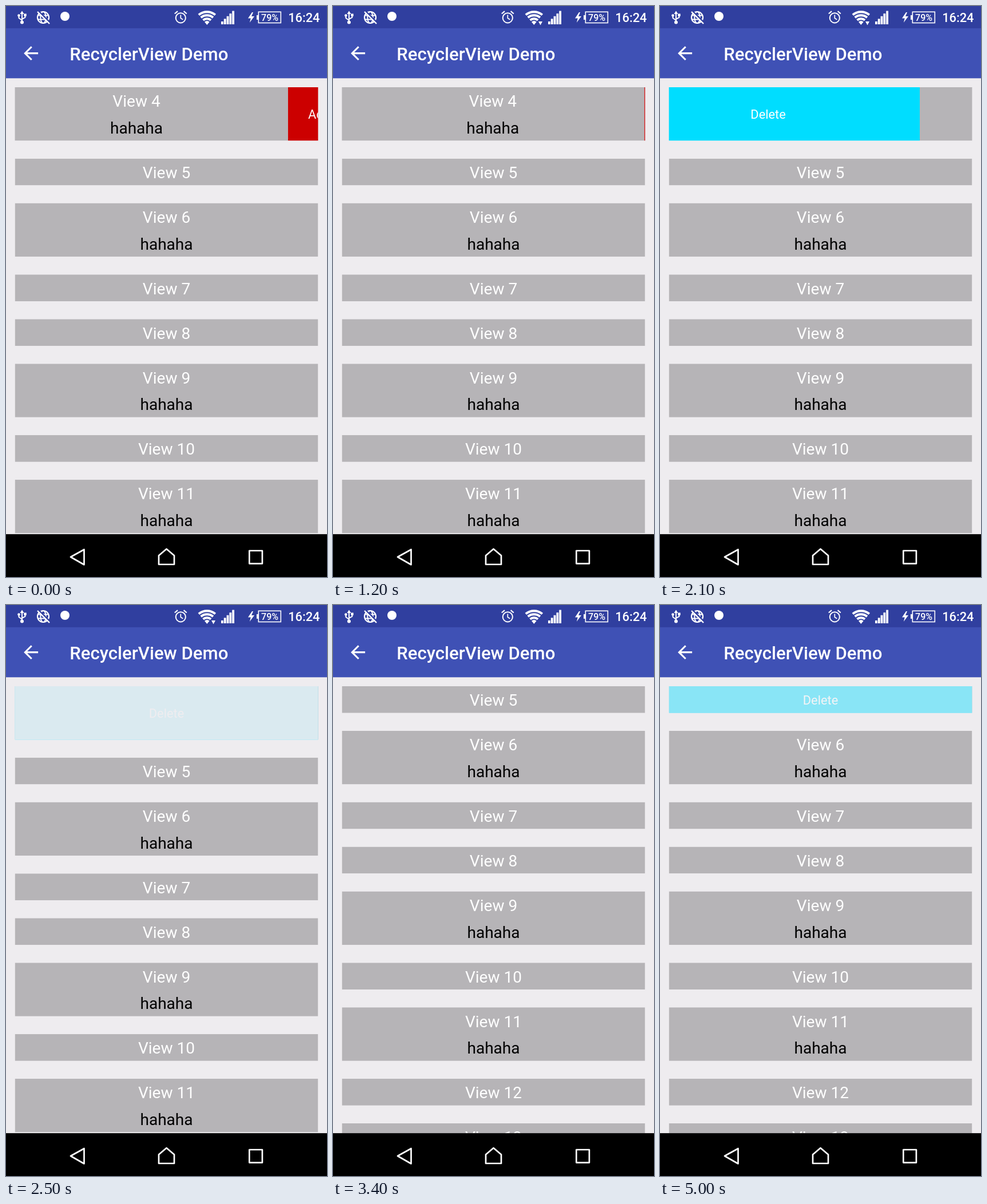
An HTML page with a canvas for the animation above (5100 ms loop, 561 by 998 pixels).

```html
<!DOCTYPE html>
<html lang="en">
<head>
<meta charset="utf-8">
<title>Swipe list</title>
<style>
  html, body { margin: 0; width: 100%; height: 100%; overflow: hidden; background: #eeecef; }
  canvas { display: block; width: 561px; height: 998px; }
</style>
</head>
<body>
<canvas id="stage"></canvas>
<script>
const W = 561, H = 998, LOOP = 5100, TICK = 100;
const DX = W / 360, DY = H / 640;
const BAR_TOP = 25 * DY, LIST_TOP = 81 * DY, LIST_END = 592 * DY;
const LEFT = 10 * DX, ROW_W = 340 * DX, ADD_W = 70 * DX;
const LINE = 30 * DY, GAP = 20 * DY;
const BIG = 18 * DX, SMALL = 14 * DX;
const FONT = 'Roboto, sans-serif';
const BG = '#eeecef', STATUS = '#303f9f', WHITE = '#fff';
const TALL = new Set([4, 6, 9, 11]);
const BACK = new Path2D('M20 11H7.83l5.59-5.59L12 4l-8 8 8 8 1.41-1.41L7.83 13H20v-2z');

const canvas = document.getElementById('stage');
const g = canvas.getContext('2d');
const ratio = window.devicePixelRatio || 1;
canvas.width = Math.round(W * ratio);
canvas.height = Math.round(H * ratio);

const part = (t, start, length) => Math.min(1, Math.max(0, (t - start) / length));
const ease = (t, start, length) => 0.5 - 0.5 * Math.cos(Math.PI * part(t, start, length));
// What is left of a decelerating move, 1 to 0
const rest = (t, start, length) => (1 - part(t, start, length)) ** 2.5;

// The first row opens to the left, closes, then is swept out to the right
function firstOffset(t) {
  if (t < 700) return (ADD_W - 52.5) * rest(t, 0, 500) - ADD_W;
  if (t < 1700) return -ADD_W * rest(t, 700, 600);
  return ROW_W * ease(t, 1700, 550);
}

const secondOffset = t => ROW_W * ease(t, 4200, 630);

function rect(x, y, w, h, color) {
  g.fillStyle = color;
  g.fillRect(x, y, w, h);
}

function text(str, x, y, size, color = WHITE, align = 'center', weight = 400) {
  g.font = `${weight} ${size}px ${FONT}`;
  g.textAlign = align;
  g.fillStyle = color;
  g.fillText(str, x, y);
}

// Text whose line box is centred on y
function label(str, x, y, size, color) {
  text(str, x, y + 0.3925 * size, size, color);
}

function stroke(width, color = WHITE) {
  g.lineWidth = width;
  g.strokeStyle = color;
  g.stroke();
}

function trace(points, close) {
  g.beginPath();
  points.forEach(([x, y]) => g.lineTo(x, y));
  if (close) g.closePath();
}

function line(points, width, color, close = false) {
  trace(points, close);
  stroke(width, color);
}

function poly(points) {
  trace(points, true);
  g.fillStyle = WHITE;
  g.fill();
}

function disc(x, y, r) {
  g.beginPath();
  g.arc(x, y, r, 0, 7);
  g.fillStyle = WHITE;
  g.fill();
}

function oval(x, y, rx, ry, width) {
  g.beginPath();
  g.ellipse(x, y, rx, ry, 0, 0, 7);
  stroke(width);
}

function clip(x, y, w, h) {
  g.save();
  g.beginPath();
  g.rect(x, y, w, h);
  g.clip();
}

const rowHeight = n => TALL.has(n) ? 2 * LINE : LINE;

function row(n, y, off = 0, fade = 0) {
  if (y > LIST_END || fade >= 1) return;
  const h = rowHeight(n), x = LEFT + off, cx = x + ROW_W / 2;
  clip(LEFT, y, ROW_W, h);
  rect(x, y, ROW_W, h, '#b6b4b7');
  label('View ' + n, cx, y + LINE / 2, BIG);
  if (TALL.has(n)) label('hahaha', cx, y + LINE * 1.5, BIG, '#000');
  if (off < 0) {
    rect(x + ROW_W, y, ADD_W, h, '#c00');
    label('Add', x + ROW_W + ADD_W / 2, y + h / 2, SMALL);
  } else if (off > 0) {
    rect(x - ROW_W, y, ROW_W, h, '#0df');
    label('Delete', cx - ROW_W, y + h / 2, SMALL);
  }
  g.globalAlpha = fade;
  rect(LEFT, y, ROW_W, h, BG);
  g.restore();
}

function list(t) {
  const top = LIST_TOP + GAP / 2;
  clip(0, LIST_TOP, W, LIST_END - LIST_TOP);
  row(4, top, firstOffset(t), ease(t, 2402, 120));
  let y = top + (rowHeight(4) + GAP) * (1 - ease(t, 2533, 250));
  row(5, y, secondOffset(t), ease(t, 4934, 120));
  for (let n = 6; n <= 13; n++) {
    y += rowHeight(n - 1) + GAP;
    row(n, y);
  }
  g.restore();
}

function usb() {
  line([[28, 12], [28, 28]], 2);
  poly([[24.5, 14], [28, 8.5], [31.5, 14]]);
  disc(28, 28.5, 3);
  line([[22.5, 17], [22.5, 21], [28, 25]], 2);
  line([[33.5, 16], [33.5, 20], [28, 23]], 2);
  disc(22.5, 16.5, 2.3);
  rect(31.3, 13.5, 4.4, 4.4, WHITE);
}

function globe() {
  oval(65, 20, 10, 10, 2.2);
  oval(65, 20, 4.7, 10, 2);
  for (const y of [16.5, 23.5]) line([[56, y], [74, y]], 2);
  line([[57, 9], [77, 29]], 2.5, STATUS);
  line([[55, 10], [76, 31]], 2.4);
}

function alarm() {
  const x = 305.3;
  oval(x, 20.8, 8.6, 8.6, 2);
  line([[x, 15.5], [x, 21.3], [x + 4, 23.8]], 1.7);
  for (const s of [-1, 1]) line([[x + s * 10.5, 13.5], [x + s * 5.3, 9.2]], 2.2);
}

function wifi(arrow) {
  const x = 351.3, y = 33, from = -0.72 * Math.PI, to = -0.28 * Math.PI;
  for (let i = 0; i < 3; i++) {
    g.beginPath();
    g.arc(x, y, 10.7 + i * 6, from, to);
    stroke(4);
  }
  g.beginPath();
  g.moveTo(x, y);
  g.arc(x, y, 6.8, from, to);
  g.fillStyle = WHITE;
  g.fill();
  if (arrow) {
    rect(358, 25.5, 9, 8.5, STATUS);
    poly([[359, 27], [366, 27], [362.5, 33.5]]);
  }
}

function signal() {
  for (let i = 0; i < 5; i++) {
    const h = 5 + i * 4.6;
    rect(376 + i * 4.8, 32 - h, 3.8, h, WHITE);
  }
}

function battery() {
  poly([[430, 11], [423, 21.5], [427.8, 21.5], [425.8, 29], [434, 18], [429, 18], [432, 11]]);
  g.lineWidth = 1.6;
  g.strokeStyle = WHITE;
  g.strokeRect(441.3, 10.3, 39, 19.2);
  rect(438, 16, 3, 8, WHITE);
  text('79%', 461, 25.5, 16, WHITE, 'center', 500);
}

function statusBar(t) {
  rect(0, 0, W, BAR_TOP, STATUS);
  usb();
  globe();
  disc(103, 18, 8);
  alarm();
  wifi((t >= 500 && t < 3400) || (t >= 4600 && t < 4900));
  signal();
  battery();
  text('16:24', 548.5, 28, SMALL, WHITE, 'right', 500);
}

function toolbar() {
  rect(0, BAR_TOP, W, LIST_TOP - BAR_TOP, '#3f51b5');
  g.save();
  g.translate(16 * DX, 41 * DY);
  g.scale(DX, DY);
  g.fillStyle = WHITE;
  g.fill(BACK);
  g.restore();
  text('RecyclerView Demo', 111.3, 95, 20 * DX, WHITE, 'left', 500);
}

function navBar() {
  rect(0, LIST_END, W, H - LIST_END, '#000');
  g.lineJoin = 'round';
  line([[113, 963], [136.5, 950], [136.5, 976.5]], 2.7, WHITE, true);
  line([[280.5, 949], [294, 960.5], [294, 976], [267, 976], [267, 960.5]], 2.7, WHITE, true);
  g.strokeRect(425.3, 952, 22.6, 22.6);
  g.lineJoin = 'miter';
}

function draw() {
  const t = Math.floor(performance.now() % LOOP / TICK) * TICK;
  g.setTransform(ratio, 0, 0, ratio, 0, 0);
  rect(0, 0, W, H, BG);
  list(t);
  statusBar(t);
  toolbar();
  navBar();
  requestAnimationFrame(draw);
}
draw();
</script>
</body>
</html>
```
